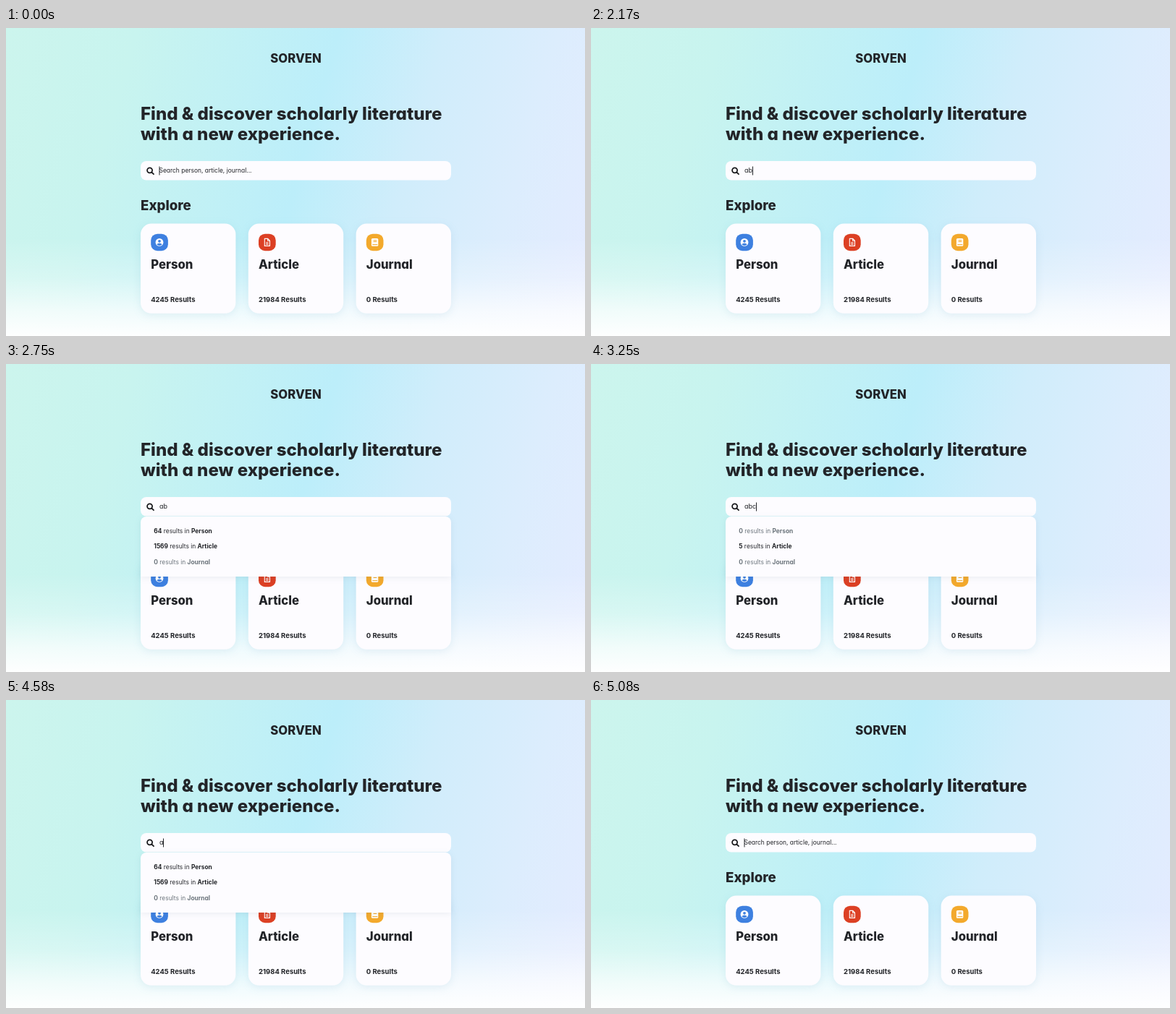
An HTML page for the animation above (5160 ms loop, 800x426 px).

```html
<!DOCTYPE html>
<html lang="en">
<head>
<meta charset="utf-8">
<title>Literature search</title>
<style>
  html, body { margin: 0; width: 100%; height: 100%; overflow: hidden; }
  body {
    background:
      linear-gradient(transparent 290px, rgba(255,255,255,.28) 345px, rgba(255,255,255,.75) 392px, rgba(255,255,255,.98) 426px),
      linear-gradient(106deg, #ccf5ed, #c8f4ef 20%, #bceefa 50%, #d0edfb 66%, #dcedfd 83%, #e5ebff);
  }
  svg { display: block; width: 800px; height: 426px; }
  text {
    font-family: Inter, "Open Sans", sans-serif;
    font-feature-settings: "cv11";
    font-weight: 700;
    fill: #222428;
  }
  .panel { fill: #fdfcff; }
  .card { filter: drop-shadow(0 3px 6px rgba(60,140,170,.11)); }
  .drop { filter: drop-shadow(0 2px 4px rgba(50,90,120,.09)); }
  .head { font-size: 24.1px; font-weight: 800; }
  .explore { font-size: 18.7px; font-weight: 800; }
  .name { font-size: 16.7px; font-weight: 800; }
  .count { font-size: 9.5px; }
  .field { font-size: 8.45px; font-weight: 400; }
  .typed { font-size: 9px; font-weight: 400; }
  .row { font-size: 8.4px; font-weight: 400; }
  .row tspan { font-weight: 700; }
  .row.none { fill: #6b747b; }
</style>
</head>
<body>
<svg viewBox="0 0 800 426">
  <text class="name" x="400.5" y="47.7" text-anchor="middle">SORVEN</text>
  <text class="head" x="186" y="127">Find &amp; discover scholarly literature</text>
  <text class="head" x="186" y="155">with a new experience.</text>

  <rect class="panel" x="186" y="184" width="429" height="26.5" rx="8"/>
  <g fill="none" stroke="#17181b" stroke-width="1.8" stroke-linecap="round">
    <circle cx="198.6" cy="196.8" r="3.5"/>
    <path d="M201.4 199.6l2.6 2.6"/>
  </g>
  <text class="field" id="hint" x="211.5" y="200.2">Search person, article, journal...</text>
  <text class="typed" id="typed" x="212" y="200.2"></text>
  <rect id="caret" y="191.5" width="1" height="12" fill="#222428"/>

  <text class="explore" x="186" y="252">Explore</text>
  <g id="cards"></g>
  <g id="drop">
    <path class="panel drop" d="M186 294V219a8 8 0 0 1 8-8H607a8 8 0 0 1 8 8V294Z"/>
    <g id="rows"></g>
  </g>
</svg>
<script>
const LOOP = 5160;
const $ = id => document.getElementById(id);
const kinds = ["Person", "Article", "Journal"];

// Icons are drawn around the centre of their badge.
const icons = {
  Person: c => `<circle r="5.4" fill="#fff"/><circle cy="-1.6" r="1.9" fill="${c}"/>
    <path d="M-3.6 3.2C-2.8 .6 2.8 .6 3.6 3.2C2 5 -2 5 -3.6 3.2Z" fill="${c}"/>`,
  Article: () => `<path d="M-3.5 -5H1L3.7 -2.3V5H-3.5ZM.8 -4.8V-2.1H3.5M-1.7 .4H1.9M-1.7 2.5H1.9"
    fill="none" stroke="#fff" stroke-width="1.1" stroke-linejoin="round"/>`,
  Journal: c => `<rect x="-4.7" y="-5.3" width="9.4" height="10.6" rx="1.5" fill="#fff"/>
    <path d="M-2 -2.8H2.7M-2 -.9H2.7M-3.3 3.2H3.7" stroke="${c}" stroke-width="1"/>`
};

function card(kind, i, color, total) {
  const x = 186 + i * 148.8;
  return `<rect class="panel card" x="${x}" y="270.6" width="131.4" height="124.2" rx="15"/>
    <rect x="${x + 14.2}" y="284.7" width="23.7" height="23.5" rx="9" fill="${color}"/>
    <g transform="translate(${x + 26} 296.4)">${icons[kind](color)}</g>
    <text class="name" x="${x + 14.2}" y="333">${kind}</text>
    <text class="count" x="${x + 14.2}" y="378.5">${total} Results</text>`;
}

const colors = ["#3e80e0", "#dc4024", "#f3a92c"];
const totals = [4245, 21984, 0];
$("cards").innerHTML = kinds.map((k, i) => card(k, i, colors[i], totals[i])).join("");

const row = (n, i) =>
  `<text class="row${n ? "" : " none"}" x="204.3" y="${233.8 + i * 21.6}"><tspan>${n}</tspan> results in <tspan>${kinds[i]}</tspan></text>`;

const two = [64, 1569, 0], three = [0, 5, 0];
const caretX = [211.5, 217, 223, 228];

// start time, query, caret shown, result counts
const steps = [
  [0, "", 1],
  [330, "", 0],
  [830, "", 1],
  [1330, "", 0],
  [1580, "a", 1],
  [2080, "ab", 1],
  [2250, "ab", 1, two],
  [2580, "ab", 0, two],
  [2830, "abc", 1, two],
  [3000, "abc", 1, three],
  [3330, "abc", 0, three],
  [3830, "ab", 1, three],
  [4000, "ab", 1, two],
  [4330, "ab", 0, two],
  [4500, "a", 1, two],
  [4670, "a", 1],
  [4830, "", 1]
];

const show = (el, on) => el.setAttribute("visibility", on ? "visible" : "hidden");

let current;
function render(now) {
  const t = now % LOOP;
  const step = steps.findLast(s => s[0] <= t);
  if (step !== current) {
    current = step;
    const [, query, caret, results] = step;
    $("typed").textContent = query;
    $("caret").setAttribute("x", caretX[query.length]);
    show($("hint"), !query);
    show($("caret"), caret);
    show($("drop"), results);
    if (results) $("rows").innerHTML = results.map(row).join("");
  }
}

const start = performance.now();
function tick() {
  render(performance.now() - start);
  requestAnimationFrame(tick);
}
tick();
</script>
</body>
</html>
```
